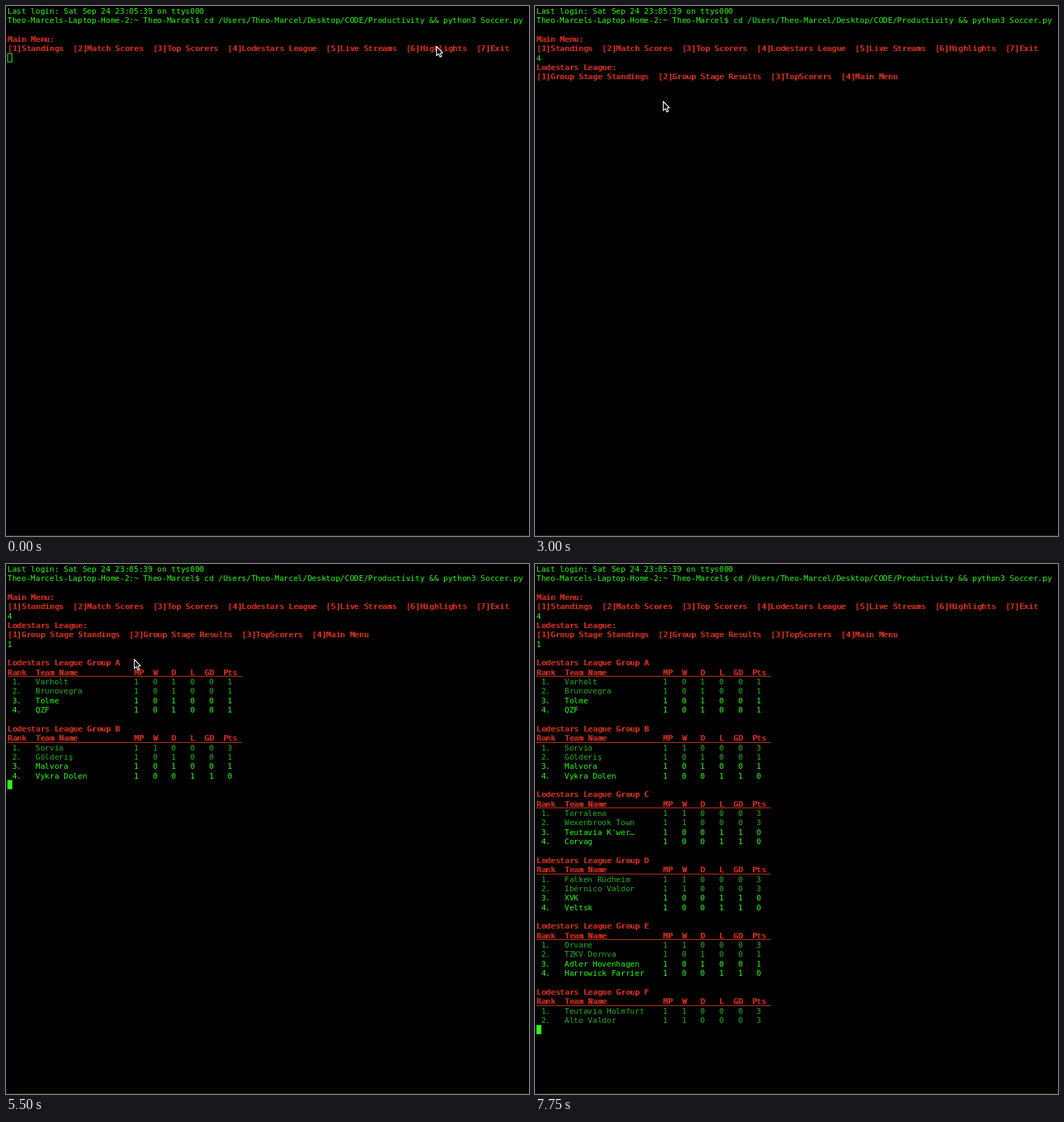
Recreate the animation shown at these times as an HTML page with a canvas. Size 744x753 px, loop 8000 ms.

```html
<!DOCTYPE html>
<html lang="en">
<head>
<meta charset="utf-8">
<title>Terminal football tables</title>
<style>
  html, body { margin: 0; width: 100%; height: 100%; overflow: hidden; background: #000; }
  canvas { display: block; }
</style>
</head>
<body>
<canvas id="stage" width="744" height="753"></canvas>
<script>
const ctx = document.getElementById('stage').getContext('2d');
const LOOP = 8000, TICK = 250;
const LEFT = 2, CELL = 20 / 3, LINE = 13.36;
const GREEN = '#28fe14', DIM = '#25b024', RED = '#d03020';
const LEAGUE = 'Lodestars League';

const plain = text => ({ text, color: GREEN });
const heading = text => ({ text, color: RED, bold: true });

const intro = [
  plain('Last login: Sat Sep 24 23:05:39 on ttys000'),
  plain('Theo-Marcels-Laptop-Home-2:~ Theo-Marcel$ cd /Users/Theo-Marcel/Desktop/CODE/Productivity && python3 Soccer.py'),
  plain(''),
  heading('Main Menu:'),
  heading(`[1]Standings  [2]Match Scores  [3]Top Scorers  [4]${LEAGUE}  [5]Live Streams  [6]Highlights  [7]Exit`)
];
const leagueMenu = [
  plain('4'),
  heading(LEAGUE + ':'),
  heading('[1]Group Stage Standings  [2]Group Stage Results  [3]TopScorers  [4]Main Menu')
];

// Team name, then played, won, drawn, lost, goal difference, points
const groups = {
  A: ['Varholt 101001', 'Brunovegra 101001', 'Tolme 101001', 'QZF 101001'],
  B: ['Sorvia 110003', 'Gölderiş 101001', 'Malvora 101001', 'Vykra Dolen 100110'],
  C: ['Torralena 110003', 'Wexenbrook Town 110003', 'Teutavia K\'wer… 100110', 'Corvag 100110'],
  D: ['Falken Rüdheim 110003', 'Ibérnico Valdor 110003', 'XVK 100110', 'Veltsk 100110'],
  E: ['Orvane 110003', 'TZKV Dornva 101001', 'Adler Hovenhagen 101001', 'Harrowick Farrier 100110'],
  F: ['Teutavia Holmfurt 110003', 'Alto Valdor 110003']
};

function tableRow(entry, i) {
  const name = entry.slice(0, -7), stats = [...entry.slice(-6)].join('   ');
  return { text: ` ${i + 1}.   ${name.padEnd(21)}${stats}`, color: i < 2 ? DIM : GREEN };
}

// Each print adds either a table header or a single row
const prints = Object.entries(groups).flatMap(([letter, teams]) => [
  [
    plain(''),
    heading(`${LEAGUE} Group ${letter}`),
    { ...heading('Rank  Team Name            MP  W   D   L  GD  Pts '), underline: true }
  ],
  ...teams.map((team, i) => [tableRow(team, i)])
]);

function screenAt(t) {
  const lines = [...intro];
  if (t >= 2250) lines.push(...leagueMenu);
  if (t >= 3750) lines.push(plain('1'));
  if (t >= 4250) {
    const step = (t - 4250) / TICK;
    const count = 1 + 2 * step - (step > 4 ? 1 : 0);
    lines.push(...prints.slice(0, count).flat());
  }
  const cursor = { row: lines.length, col: 0, style: 'solid' };
  if (t < 750) cursor.style = 'hollow';
  else if ((t >= 1000 && t < 1500) || (t >= 2000 && t < 2250) || (t >= 3000 && t < 3500)) cursor.style = 'off';
  if (t >= 3500 && t < 3750) {
    lines.push(plain('1'));
    cursor.col = 1;
  }
  return { lines, cursor };
}

function drawLine({ text, color, bold, underline }, row) {
  const top = row * LINE, baseline = Math.round(top + 10.7);
  ctx.fillStyle = color;
  ctx.font = '11px "DejaVu Sans Mono", monospace';
  [...text].forEach((char, col) => {
    const x = Math.round(LEFT + col * CELL);
    ctx.fillText(char, x, baseline);
    // The terminal thickens bold text by striking it twice
    if (bold) ctx.fillText(char, x + 1, baseline);
  });
  if (underline) ctx.fillRect(LEFT, Math.round(top + LINE) - 1, text.length * CELL, 1);
}

function drawCursor({ row, col, style }) {
  const x = Math.round(LEFT + col * CELL), y = Math.round(row * LINE);
  ctx.fillStyle = ctx.strokeStyle = GREEN;
  ctx.lineWidth = 1;
  if (style === 'solid') ctx.fillRect(x, y, 7, 13);
  if (style === 'hollow') ctx.strokeRect(x + 0.5, y + 0.5, 6, 12);
}

function pointerAt(t) {
  if (t >= 7000) return null;
  if (t >= 6750) return [660, 300];
  const p = Math.min(t / 1000, 1), eased = p * p * (3 - 2 * p);
  return [Math.round(612 - 430 * eased), Math.round(57 + 78 * eased)];
}

function drawPointer([x, y]) {
  ctx.save();
  ctx.translate(x + 0.5, y + 0.5);
  ctx.fillStyle = '#000';
  ctx.strokeStyle = '#fff';
  ctx.lineWidth = 1.2;
  ctx.lineJoin = 'round';
  ctx.beginPath();
  [[0, 0], [0, 13], [3, 10.4], [5, 15], [7.2, 14.1], [5.2, 9.5], [8.8, 9.2]].forEach(p => ctx.lineTo(...p));
  ctx.closePath();
  ctx.fill();
  ctx.stroke();
  ctx.restore();
}

function draw(now) {
  const t = Math.floor((now % LOOP) / TICK) * TICK;
  const { lines, cursor } = screenAt(t), pointer = pointerAt(t);
  ctx.fillStyle = '#000';
  ctx.fillRect(0, 0, 744, 753);
  lines.forEach(drawLine);
  drawCursor(cursor);
  ctx.fillStyle = '#0c3a0c';
  ctx.fillRect(0, 752, 744, 1);
  if (pointer) drawPointer(pointer);
}

const start = performance.now();
function frame() {
  draw(performance.now() - start);
  requestAnimationFrame(frame);
}
frame();
</script>
</body>
</html>
```
